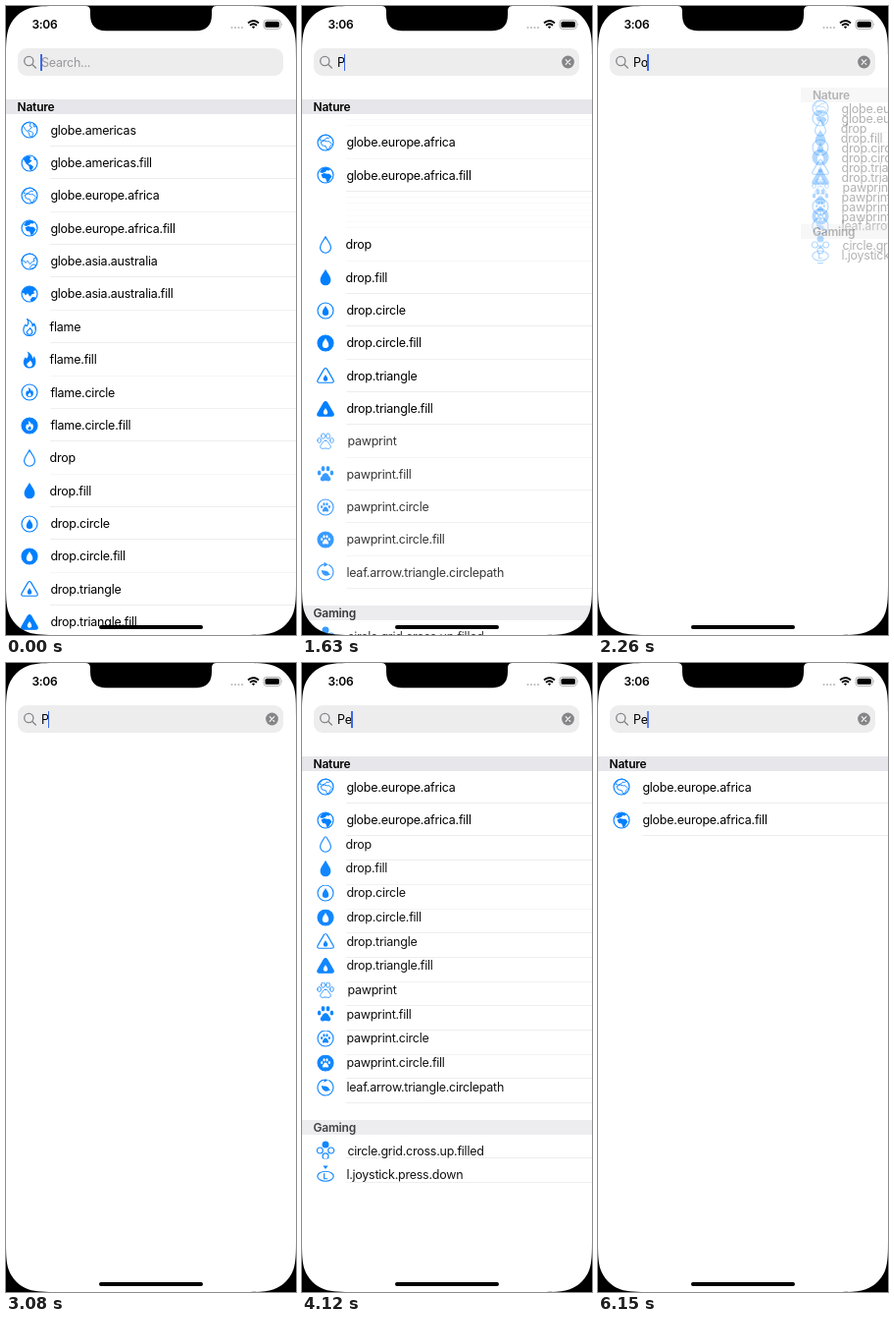
These frames come from a looping animation (296x640 px, 6.19 s). An HTML page:

```html
<!DOCTYPE html>
<html lang="en">
<head>
<meta charset="utf-8">
<title>Symbol search</title>
<style>
  html, body { margin: 0; width: 100%; height: 100%; overflow: hidden; background: #000; }
  #stage {
    position: absolute; left: 0; top: 0; width: 296px; height: 640px; overflow: hidden;
    background: #fff; color: #000;
    font: 400 12.5px Inter, Roboto, sans-serif; letter-spacing: -.24px; white-space: pre;
  }
  #stage > *, .row > * { position: absolute; }
  .head {
    left: 0; width: 296px; height: 15px; background: #e7e7eb; text-indent: 11.5px;
    font-weight: 600; font-size: 12px; line-height: 15px; letter-spacing: -.2px;
  }
  .row { left: 0; width: 296px; height: 33.35px; line-height: 33.35px; }
  .row svg { left: 14px; top: 6.7px; }
  .row span { left: 45.4px; }
  .row i { left: 45px; right: 0; height: 1px; background: #ededef; }
  .row svg { fill: none; stroke: #007fff; stroke-width: 1.15; stroke-linejoin: round; stroke-linecap: round; }
  .row svg .solid { fill: #007fff; fill-rule: evenodd; stroke: none; }
  .row svg .thin { stroke-width: .85; }
  .row svg .hole { fill: #fff; fill-rule: evenodd; stroke: none; }
  #bar { left: 12px; top: 43px; width: 271px; height: 28px; border-radius: 9px; background: #ededee; }
  #field { left: 36px; top: 43.6px; line-height: 28px; }
  #caret { top: 48.5px; width: 1.7px; height: 17px; background: #3a68ee; }
  #clock { left: 26.5px; top: 11px; font-weight: 600; font-size: 12px; line-height: 16px; letter-spacing: -.3px; }
  #home { left: 95px; top: 630px; width: 106px; height: 4px; border-radius: 2px; background: #000; }
  #chrome { left: 0; top: 0; }
</style>
</head>
<body>
<div id="stage">
  <div id="bar"></div>
  <div id="field"></div>
  <div id="caret"></div>
  <svg id="chrome" width="296" height="640" viewBox="0 0 296 640">
    <defs><path id="corner" d="M0 0H1.529C1.088 0 .868 0 .631.075C.373.169.169.373.075.631C0 .868 0 1.088 0 1.529Z"/></defs>
    <use href="#corner" transform="scale(36)"/>
    <use href="#corner" transform="translate(296 0) scale(-36 36)"/>
    <use href="#corner" transform="translate(0 640) scale(36 -36)"/>
    <use href="#corner" transform="translate(296 640) scale(-36)"/>
    <path d="M81 0Q86 0 86 5V9C86 20 92 25.2 102 25.2H194C204 25.2 210 20 210 9V5Q210 0 215 0Z"/>
    <g fill="#bcbcc0"><circle cx="230.5" cy="22" r="1.1"/><circle cx="234" cy="22" r="1.1"/><circle cx="237.5" cy="22" r="1.1"/><circle cx="241" cy="22" r="1.1"/></g>
    <g fill="none" stroke="#000" stroke-width="1.8">
      <path d="M247 17.4Q252.5 12.6 258 17.4M249 19.8Q252.5 16.8 256 19.8"/>
      <path d="M252.5 23L250.9 21.2Q252.5 20 254.1 21.2Z" fill="#000" stroke="none"/>
    </g>
    <rect x="263" y="14.3" width="17.4" height="9" rx="2.8" fill="none" stroke="#a4a4a6" stroke-width=".9"/>
    <rect x="264.5" y="15.8" width="14.4" height="6" rx="1.5"/>
    <path d="M281.6 17.3q1.6 1.5 0 3z" fill="#a4a4a6"/>
    <g fill="none" stroke="#858589" stroke-width="1.3" stroke-linecap="round"><circle cx="23.3" cy="56" r="4.6"/><path d="M26.8 59.5L30.4 63"/></g>
    <g id="clear"><circle cx="271.5" cy="57" r="6.4" fill="#868689"/><path d="M269.2 54.7l4.6 4.6m0-4.6l-4.6 4.6" stroke="#f4f4f5" stroke-width="1.2" stroke-linecap="round"/></g>
  </svg>
  <div id="clock">3:06</div>
  <div id="home"></div>
</div>
<script>
const LOOP = 6190, ROW = 33.35;
const $ = id => document.getElementById(id);
const stage = $('stage');

// ---- icons ----
const oval = (x, y, rx, ry) =>
  `M${x - rx} ${y}a${rx} ${ry} 0 1 0 ${2 * rx} 0a${rx} ${ry} 0 1 0 ${-2 * rx} 0z`;
const path = (d, cls = '', move = '') => `<path class="${cls}" transform="${move}" d="${d}"/>`;
const ring = '<circle r="8"/>';
const triangle = 'M-1.6-6.4Q0-8.6 1.6-6.4L8 4.6Q9 7.2 6.4 7.2H-6.4Q-9 7.2-8 4.6Z';

const land = {
  americas: 'M-6.5-4.5L-2-7.5 1.5-6.5 0-4 2.5-2.5 0-.5-1.5 1 1.5 1.5 4 3.5 2 7.5 0 6-.5 3-3.5.5ZM4-6.5L7-3.5 5-3Z',
  europe: 'M-6-3L-3.5-6.8 1-8 5-6 3.5-4.6 1-4.8 0-3.2-3.5-2ZM-4.5-.5L-1.5-2 1.5-1.2 4-1.2 6.5 1.5 5 3.5 3.5 6.2 1.5 7.2.2 3.5-3 3Z',
  asia: 'M-8-1L-5.5-.8-4 1.5-2-.8.5 2.8 2.5.3 5-.5 4-3 7-4 4-7 0-8-5-6.2ZM.5 6L3 3 6.8 3.5 5.5 6 2 7.5Z'
};
const shape = {
  flame: 'M-2.5-8.5C.5-7 3.3-4.5 3-1.2C4.2-1.8 4.3-3 4.2-4C6-2 6.6.5 6.3 3C5.8 6.8 3.2 8.5 0 8.5C-4 8.5-6.2 5.8-6.2 2.5C-6.2 0-5.2-1.3-4.2-2.8C-3.8-1.5-3-1.3-2.2-2C-1-4-1-6.5-2.5-8.5Z' +
         'M.5.6C1.8 1.8 3 3.3 2.8 5C2.6 6.6 1.5 7.2 0 7.2C-1.6 7.2-2.7 6.3-2.7 4.8C-2.7 3 .2 2.8.5.6Z',
  drop: 'M0-8.3C1.8-4.5 5.4-1 5.4 2.9A5.4 5.3 0 0 1-5.4 2.9C-5.4-1-1.8-4.5 0-8.3Z',
  pawprint: oval(-6.4, -1, 1.8, 2.5) + oval(-2.5, -5.4, 1.9, 2.7) + oval(2.5, -5.4, 1.9, 2.7) + oval(6.4, -1, 1.8, 2.5) +
            'M0-.8C2.6-.8 3.2 2 4.6 3.6C6.3 5.6 4.6 8 2.4 7.4C.8 6.9-.8 6.9-2.4 7.4C-4.6 8-6.3 5.6-4.6 3.6C-3.2 2-2.6-.8 0-.8Z'
};

function icon(name) {
  const [base, next] = name.split('.');
  const full = name.endsWith('.fill');
  const inner = full ? 'hole' : 'solid';
  if (base === 'globe') return ring + path(land[next], full ? 'solid' : 'thin');
  if (base === 'leaf') return path('M3.5-7.2A8 8 0 1 1-1.5-7.9') + path('M-1.5-10.2L2.8-7.8-1.5-5.3Z', 'solid') +
    path('M-5-2.5C-1-1.5 3.5-2.5 4.5 2L6 3.2 4 3.6C1 5.5-4 4-5-2.5Z', 'solid', 'scale(.85)');
  if (base === 'circle') return path(oval(-5.7, 0, 3, 3) + oval(5.7, 0, 3, 3) + oval(0, 5.9, 3, 3)) +
    path(oval(0, -5.9, 3.5, 3.5), 'solid');
  if (base === 'l') return path(oval(0, 1.2, 8.2, 5)) + path('M-2.6-9.5H2.6L0-6Z', 'solid') + path('M-2.5 8.6H2.5') +
    path('M-1.4-1.4V3.7H1.7');
  const d = shape[base];
  if (next === 'circle') return path(oval(0, 0, 8, 8), full ? 'solid' : '') + (full ? ring : '') + path(d, inner, 'scale(.6)');
  if (next === 'triangle') return path(triangle, full ? 'solid' : '') + (full ? path(triangle) : '') +
    path(d, inner, 'translate(0 2.4) scale(.42)');
  return path(d, full ? 'solid' : base === 'pawprint' ? 'thin' : '');
}

// ---- list ----
const pairs = ['globe.americas', 'globe.europe.africa', 'globe.asia.australia', 'flame', 'flame.circle',
  'drop', 'drop.circle', 'drop.triangle', 'pawprint', 'pawprint.circle'].flatMap(n => [n, n + '.fill']);
const sections = [
  ['Nature', [...pairs, 'leaf.arrow.triangle.circlepath']],
  ['Gaming', ['circle.grid.cross.up.filled', 'l.joystick.press.down']]
].map(([title, names]) => ({ head: add('head', title), rows: names.map(makeRow) }));

function add(cls, html) {
  const el = document.createElement('div');
  el.className = cls;
  el.innerHTML = html;
  stage.insertBefore(el, $('bar'));
  return el;
}
function makeRow(name) {
  const el = add('row', `<i></i><svg width="20" height="20" viewBox="-10 -10 20 20" overflow="visible">${icon(name)}</svg><span>${name}</span>`);
  const label = el.lastChild.style;
  if (/^(pawprint$|circle)/.test(name)) label.left = '46.4px';
  if (/^(drop|flame)(\.fill)?$/.test(name)) label.left = '44.6px';
  return { el, line: el.firstChild, p: name.includes('p'), pe: name.includes('pe'), late: /^(paw|leaf|circle|l\.)/.test(name) };
}

// ---- time ----
const blink = [[0, 1], [80, .7], [160, .35], [240, 0], [520, .5], [600, 1], [1190, .5], [1270, 0], [1450, 1],
  [2650, .5], [2730, 0], [3010, 1], [3600, .5], [3700, 0], [3940, 1], [4680, .5], [4760, 0], [5040, .5],
  [5120, 1], [5700, .5], [5780, 0], [5990, .3], [6070, .55], [6150, .8]];
const typed = [[0, ''], [1450, 'P'], [2010, 'Po'], [3010, 'P'], [3940, 'Pe']];
const homeFade = [[0, 1], [3230, .55], [3600, .8], [3700, 1]];
const run = (from, n) => Array.from({ length: n }, (_, i) => from + 80 * i);
const ticks = [0, 1450, ...run(1550, 3), 1800, 2010, ...run(2100, 4), 2410, ...run(3230, 3), ...run(3940, 7)];

const clamp = v => Math.min(1, Math.max(0, v));
const at = (keys, t) => keys.filter(k => k[0] <= t).pop()[1];
function ramp(t, start, span) {
  const u = clamp((t - start) / span);
  return u * u * (3 - 2 * u);
}

function layout(t) {
  const first = t < 1450 ? 0 : ramp(t, 1355, 380);
  const second = ramp(t, 3960, 420);
  const fold = ramp(t, 2065, 306) - ramp(t, 3085, 305);
  const arrive = clamp((first - .156) / .844);
  let y = 102 - 17 * fold;

  sections.forEach(({ head, rows }, s) => {
    head.style.top = y - 7.2 + 'px';
    head.style.left = 296 * fold + 'px';
    head.style.opacity = (1 - fold) * (s ? arrive * (1 - second) : 1);
    y += 24.4 - 14.4 * fold;
    let leading = true;
    for (const r of rows) {
      const gone = Math.max(r.p ? 0 : first, r.pe ? 0 : second);
      const cut = ROW * gone;
      if (!gone) leading = false;
      // after a kept row, a leaving row slides up beneath it; otherwise its foot is cut off
      const css = r.el.style;
      css.top = y - ROW / 2 - (leading ? 0 : cut) + 'px';
      css.left = 290 * fold + 'px';
      css.opacity = (1 - gone * gone) * (1 - fold) * (r.late ? arrive : 1);
      css.clipPath = leading ? `inset(0 0 ${cut}px 0)` : `inset(${cut}px 0 0 0)`;
      r.line.style.top = ROW - (leading ? cut : 0) - ROW * fold / 2 - 1 + 'px';
      y += (ROW - cut) * (1 - fold);
    }
    y += 7.15 - 17.35 * fold;
  });
}

let shown = -1;
function frame(now) {
  const t = now % LOOP;
  const step = ticks.filter(k => k <= t).pop();
  if (step !== shown) layout(shown = step);

  const text = at(typed, t), field = $('field');
  field.textContent = text || 'Search...';
  field.style.color = text ? '#000' : '#98989c';
  $('clear').style.display = text ? '' : 'none';
  $('caret').style.left = [35.2, 42.8, 50][text.length] + 'px';
  $('caret').style.opacity = at(blink, t);
  $('home').style.opacity = at(homeFade, t);
}

const begin = performance.now();
function loop() {
  frame(performance.now() - begin);
  requestAnimationFrame(loop);
}
loop();
</script>
</body>
</html>
```
